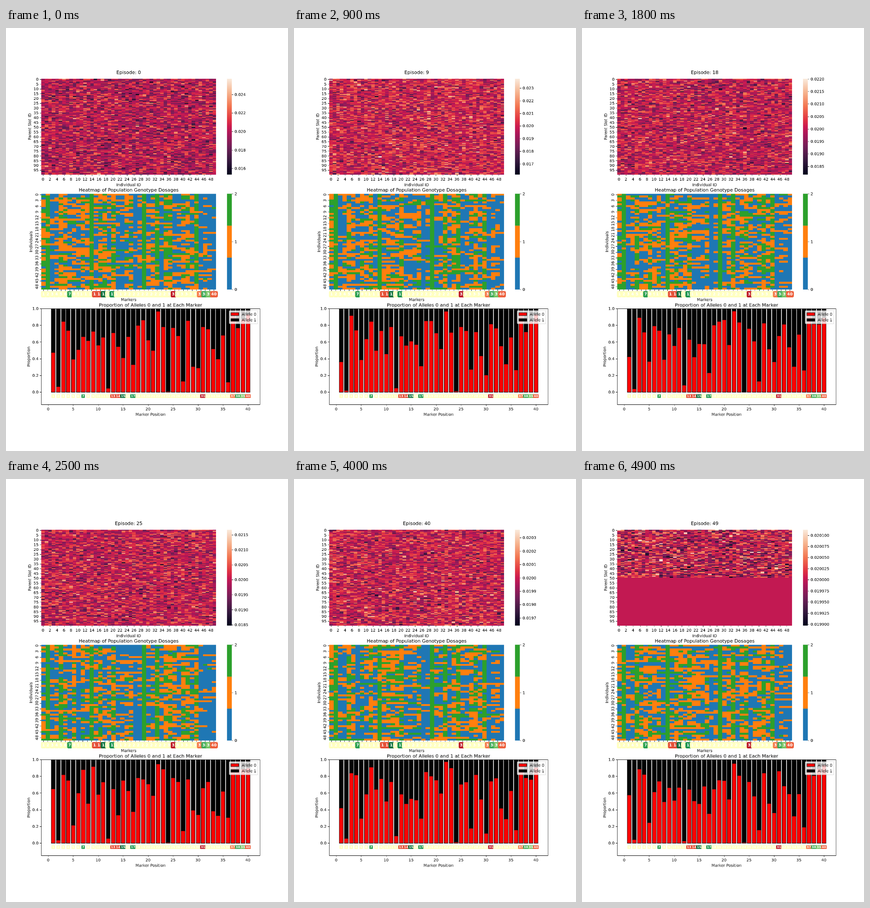
These frames come from a looping animation (611x917 px, 5 s). An HTML page with a canvas:

```html
<!DOCTYPE html>
<html lang="en">
<head>
<meta charset="utf-8">
<title>Episodes</title>
<style>
  html, body { margin: 0; width: 100%; height: 100%; overflow: hidden; background: #fff; }
  canvas { display: block; }
</style>
</head>
<body>
<canvas id="stage" width="611" height="917"></canvas>
<script>
// The figure is drawn at 1000 x 1500 and scaled down to the stage.
const stage = document.getElementById('stage').getContext('2d');
const figure = newCanvas(1000, 1500);
const ctx = figure.getContext('2d');

const EPISODES = 50, MARKERS = 40;
const LEFT = 125, MAP_W = 620, RIGHT = 900, H = 339.7;
const TOP = [180, 587.6, 995.3];
const BAR_X = 783.75, BAR_W = 17;
const PT = 100 / 72;
const LABEL_X = 115.3, BAR_LABEL_X = 810.4;
const MAP_MID = LEFT + MAP_W / 2, PLOT_MID = (LEFT + RIGHT) / 2;
const UPRIGHT = { turn: -Math.PI / 2 };

const DOSE = ['#1f77b4', '#ff7f0e', '#2ca02c'];
const ROCKET = [[0, '#03051a'], [1 / 7, '#35193e'], [2 / 7, '#701f57'], [3 / 7, '#ad1759'], [.5, '#cb1a50'],
  [4 / 7, '#e13342'], [5 / 7, '#f37651'], [6 / 7, '#f6b48f'], [1, '#faebdd']];
const BADGE = {
  7: '#2aa050', 13: '#e54e35', 14: '#e54e35', 15: '#056f3b', 17: '#17934e',
  31: '#be1827', 37: '#f67a49', 38: '#3faa59', 39: '#78c565', 40: '#ee613d'
};

// key points: episode, lowest and highest probability
const RANGE = [
  [0, .01535, .02569], [9, .01616, .02373], [18, .01817, .02201], [25, .01847, .02167],
  [32, .01908, .02113], [40, .019643, .02036], [49, .019897, .0201124]
];

// typical share of allele 0 at each marker; every episode scatters around it
const TYPICAL = [.46, .04, .86, .77, .38, .64, .77, .43, .80, .52, .72, .06, .62, .51, .59, .60, .34, .82, .82, .75,
  .48, .97, .82, .01, .74, .66, .18, .80, .44, .27, .76, .78, .46, .34, .59, .22, .92, .80, .87, .93];

const clamp = v => Math.max(0, Math.min(1, v));
const mix = (a, b, k) => a + (b - a) * k;
const snap = v => Math.round(v) + .5;

function newCanvas(width, height) {
  return Object.assign(document.createElement('canvas'), { width, height });
}

function randomizer(seed) {
  let s = seed * 7919 + 12345;
  return () => {
    s = s + 0x6D2B79F5 | 0;
    let t = Math.imul(s ^ s >>> 15, 1 | s);
    t = t + Math.imul(t ^ t >>> 7, 61 | t) ^ t;
    return ((t ^ t >>> 14) >>> 0) / 4294967296;
  };
}
const gauss = rnd => Math.sqrt(-2 * Math.log(1 - rnd())) * Math.cos(2 * Math.PI * rnd());

function rocket(c, x0, y0, x1, y1) {
  const g = c.createLinearGradient(x0, y0, x1, y1);
  ROCKET.forEach(stop => g.addColorStop(...stop));
  return g;
}

function makePalette() {
  const c = newCanvas(256, 1).getContext('2d');
  c.fillStyle = rocket(c, 0, 0, 256, 0);
  c.fillRect(0, 0, 256, 1);
  const px = c.getImageData(0, 0, 256, 1).data;
  return Array.from({ length: 256 }, (_, i) => `rgb(${px.slice(4 * i, 4 * i + 3)})`);
}
const palette = makePalette();

function text(str, x, y, { size = 10, align = 'center', turn = 0, bold = '', color = '#000' } = {}) {
  ctx.save();
  ctx.translate(x, y);
  ctx.rotate(turn);
  ctx.font = `${bold} ${size * PT}px "DejaVu Sans", sans-serif`;
  ctx.textAlign = align;
  ctx.fillStyle = color;
  ctx.fillText(str, 0, size * PT * .365);
  ctx.restore();
}

function rect(x, y, w, h, color) {
  ctx.fillStyle = color;
  ctx.fillRect(x, y, w, h);
}

function outline(x, y, x2, y2, width) {
  ctx.strokeStyle = '#000';
  ctx.lineWidth = width;
  ctx.strokeRect(x, y, x2 - x, y2 - y);
}

function box(x, y, x2, y2, color) {
  [x, y, x2, y2] = [x, y, x2, y2].map(snap);
  rect(x, y, x2 - x, y2 - y, color);
  outline(x, y, x2, y2, PT);
}

const tickX = (x, y) => rect(snap(x) - .55, y, 1.1, 4.9, '#000');
const tickY = (x, y) => rect(x, snap(y) - .55, 4.9, 1.1, '#000');

function xTick(label, x, y) {
  tickX(x, y);
  text(label, x, y + 16);
}
function yTick(label, y) {
  tickY(LEFT - 4.9, y);
  text(label, LABEL_X, y, { align: 'right' });
}
function barTick(label, y) {
  tickY(BAR_X + BAR_W, y);
  text(label, BAR_LABEL_X, y, { align: 'left' });
}

function cells(top, cols, rows, color) {
  const atX = c => Math.round(LEFT + MAP_W * c / cols), atY = r => Math.round(top + H * r / rows);
  for (let r = 0; r < rows; r++) {
    for (let c = 0; c < cols; c++) {
      rect(atX(c), atY(r), atX(c + 1) - atX(c), atY(r + 1) - atY(r), color(r, c));
    }
  }
}

function badge(n, x, y, size, pad, height) {
  const w = String(n).length * size * PT * .696 + 2 * pad;
  ctx.fillStyle = BADGE[n] || '#ffffbf';
  ctx.beginPath();
  ctx.roundRect(x - w / 2, y - height / 2, w, height, pad);
  ctx.fill();
  text(n, x, y - 1, { size, bold: 'bold', color: '#fff' });
}

function limits(ep) {
  const i = Math.max(1, RANGE.findIndex(r => r[0] >= ep));
  const [a, b] = [RANGE[i - 1], RANGE[i]], k = (ep - a[0]) / (b[0] - a[0]);
  return [mix(a[1], b[1], k), mix(a[2], b[2], k)];
}

// smallest round step that gives at most nine intervals, and its decimals
function tickStep(span) {
  for (let e = -6; ; e++) {
    for (const m of [1, 2, 2.5, 5]) {
      const step = m * 10 ** e;
      if (span / step <= 9) return [step, (m === 2.5) - e];
    }
  }
}

function drawPolicy(ep, rnd) {
  const [lo, hi] = limits(ep), top = TOP[0], bottom = top + H;
  const last = ep === EPISODES - 1;
  const mean = (.02 - lo) / (hi - lo), spread = last ? .18 : .135;
  text('Episode: ' + ep, MAP_MID, 157.4, { size: 12 });
  cells(top, 50, 100, r => {
    const v = last && r >= 50 ? mean : clamp(mean + spread * gauss(rnd));
    return palette[Math.round(v * 255)];
  });
  for (let i = 0; i < 50; i += 2) xTick(i, LEFT + MAP_W * (i + .5) / 50, bottom);
  for (let i = 0; i < 100; i += 5) yTick(i, top + H * (i + .5) / 100);
  text('Individual ID', MAP_MID, 555.5);
  text('Parent Slot ID', 83.5, top + H / 2, UPRIGHT);

  rect(BAR_X, top, BAR_W, H, rocket(ctx, 0, bottom, 0, top));
  const [step, digits] = tickStep(hi - lo);
  for (let n = Math.ceil(lo / step); n * step <= hi; n++) {
    barTick((n * step).toFixed(digits), top + H * (hi - n * step) / (hi - lo));
  }
}

function drawDosage(share, rnd) {
  const top = TOP[1];
  text('Heatmap of Population Genotype Dosages', MAP_MID, 573.8, { size: 12 });
  // neighbouring markers are mostly inherited together
  let strands;
  cells(top, MARKERS, 50, (r, c) => {
    if (c === 0) strands = [rnd(), rnd()];
    else strands = strands.map(s => rnd() < .35 ? rnd() : s);
    return DOSE[strands.filter(s => s >= share[c]).length];
  });
  for (let i = 0; i < 50; i += 3) {
    const y = top + H * (i + .5) / 50;
    tickY(LEFT - 4.9, y);
    text(i, 109.3, y, UPRIGHT);
  }
  for (let i = 1; i <= MARKERS; i++) {
    const x = LEFT + MAP_W * (i - .5) / MARKERS;
    tickX(x, top + H);
    badge(i, x, 943.9, 10, 4.17, 22);
  }
  text('Markers', MAP_MID, 963);
  text('Individuals', 88.4, top + H / 2, UPRIGHT);

  DOSE.forEach((color, i) => {
    rect(BAR_X, top + H * (2 - i) / 3, BAR_W, H / 3, color);
    barTick(i, top + H * (2 - i) / 2);
  });
}

function drawLegend() {
  ctx.beginPath();
  ctx.roundRect(791.7, 1002.2, 101.4, 46.5, 2.8);
  ctx.fillStyle = 'rgba(255,255,255,.8)';
  ctx.fill();
  ctx.strokeStyle = 'rgba(204,204,204,.8)';
  ctx.lineWidth = PT;
  ctx.stroke();
  ['#f00', '#000'].forEach((color, i) => {
    const y = 1009.3 + 20.4 * i;
    box(797.2, y, 825, y + 9.7, color);
    text('Allele ' + i, 836.1, y + 5.2, { align: 'left' });
  });
}

function drawBars(share) {
  const top = TOP[2], bottom = top + H, base = top + H / 1.15, unit = 17.702;
  const atX = v => LEFT + (v + 1.39) * unit, atY = v => mix(base, top, v);
  text('Proportion of Alleles 0 and 1 at Each Marker', PLOT_MID, 981.5, { size: 12 });

  ctx.save();
  ctx.beginPath();
  ctx.rect(LEFT, top, RIGHT - LEFT, H);
  ctx.clip();
  share.forEach((p, i) => {
    box(atX(i + .6), atY(p), atX(i + 1.4), base, '#f00');
    box(atX(i + .6), top, atX(i + 1.4), atY(p), '#000');
  });
  ctx.restore();
  for (let i = 1; i <= MARKERS; i++) badge(i, atX(i), 1305.5, 8, 2.22, 13.2);

  outline(...[LEFT, top, RIGHT, bottom].map(snap), 1.1);
  for (let i = 0; i <= MARKERS; i += 5) xTick(i, atX(i), bottom);
  for (let i = 0; i <= 5; i++) yTick((i / 5).toFixed(1), atY(i / 5));
  text('Marker Position', PLOT_MID, 1370.3);
  text('Proportion', 80.2, top + H / 2, UPRIGHT);
  drawLegend();
}

function draw(ep) {
  const rnd = randomizer(ep + 1);
  const share = TYPICAL.map(p => clamp(p + .35 * p * (1 - p) * gauss(rnd)));
  rect(0, 0, 1000, 1500, '#fff');
  drawPolicy(ep, rnd);
  drawDosage(share, rnd);
  drawBars(share);
  stage.drawImage(figure, 0, 0, 611, 917);
}

let shown = -1;
const start = performance.now();
function tick() {
  const ep = Math.floor((performance.now() - start) / 100) % EPISODES;
  if (ep !== shown) draw(shown = ep);
  requestAnimationFrame(tick);
}
tick();
</script>
</body>
</html>
```
